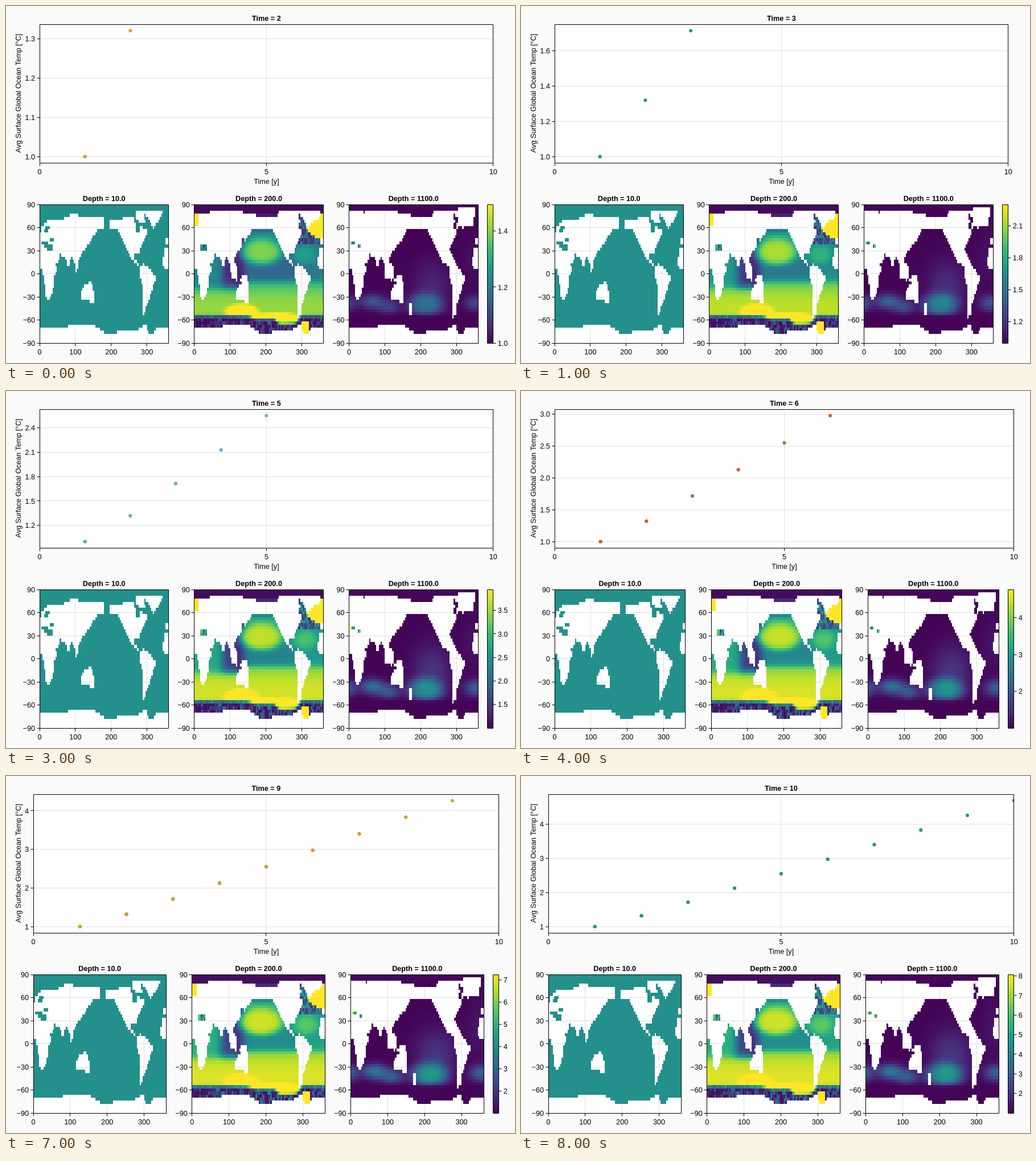
An HTML page with a canvas for the animation above (9000 ms loop, 894 by 626 pixels).

```html
<!DOCTYPE html>
<html>
<head>
<meta charset="utf-8">
<style>
html, body { margin: 0; width: 100%; height: 100%; overflow: hidden; background: #fafafa; }
canvas { display: block; }
</style>
</head>
<body>
<canvas id="stage" width="894" height="626"></canvas>
<script>
const ctx = document.getElementById('stage').getContext('2d');
const FONT = '12.65px "Liberation Sans", Arial, sans-serif';
const TOP = 32, TOP_END = 275, MAP = 348, MAP_END = 591, CELL = 4, COLS = 90, ROWS = 45;
const dotColors = ['#1f76b3', '#dfa014', '#159f75', '#c878a5', '#5eafda', '#cf611a', '#f1e23a'];
const viridis = ['440154', '482878', '3e4989', '31688e', '26828e', '1f9e89', '35b779', '6ece58', 'b5de2b', 'fde725']
  .map(h => [0, 2, 4].map(i => parseInt(h.substr(i, 2), 16)));

const meanTemp = year => 1 + .4325 * (year - 1) - .225 * (year - 1) / year;
const colorTop = year => 3.113 + .8263 * (year - 4) + .14 / year ** 2;
const clamp = v => Math.max(0, Math.min(1, v));
const mix = (a, b, k) => a + (b - a) * k;
function shade(v) {
  const p = clamp(v) * 9, i = Math.min(8, Math.floor(p));
  return viridis[i].map((a, k) => Math.round(mix(a, viridis[i + 1][k], p - i)));
}

// Key points of the coasts in degrees: longitude 0..360, latitude -90..90
const paths = list => list.map(d => new Path2D(d));
const coast = paths([
  'M0 48 6 60 26 71 60 70 96 79 114 75 181 73 181 60 163 58 143 43 124 30 109 19 109 10 103 1 97 17 90 22 79 7 72 21 58 25 52 13 43 12 34 30 0 30z',
  'M0 35 33 31 43 11 51 11 40 -6 40 -15 28 -34 19 -35 13 -10 8 4 0 6z',
  'M360 5 352 5 343 14 350 32 360 36zM352 37H360V48L352 43z',
  'M197 56 197 71 264 73 269 56 280 52 282 62 304 54 279 32 278 26 264 28 263 19 273 17 278 9 290 12 308 6 325 -6 302 -38 291 -54 286 -50 289 -18 280 -4 282 7 255 20 236 42 214 60z',
  'M268 83 344 82 336 70 318 60 304 74 290 77 298 66 284 64 268 73z',
  'M115 -35 114 -23 128 -13 143 -11 153 -26 150 -39 130 -32z'
]);
const coastSeas = paths(['M0 37 10 38 20 31 36 32 36 36 12 44zM28 41H40V46H28zM12 55 22 55 26 60 20 64z']);
const shelf = paths([
  'M12 60 14 79 100 82 172 78 174 74 230 74 236 80 288 82 292 60 262 50 230 58 160 58z',
  'M288 82H352L354 73 326 68 308 74zM0 30V62L14 60H48V30z',
  'M98 18 104 -4 118 -8 119 8 110 20zM128 -10 132 0 148 -4 154 -26z',
  'M300 -38 302 -50 290 -56z'
]);
const shelfSeas = paths(['M16 38H34V32H16zM132 44H138V40H132z']);
const deep = paths([
  'M280 50 300 50 304 84H350L348 64 312 64zM0 40V82H40V40z',
  'M264 32 262 16 282 8 300 12 280 32zM140 60 163 60 146 42z',
  'M98 14 100 -6 126 -8 122 10 110 18zM169 -37H174V-53H169z'
]);
const deepSeas = paths(['M4 42H16V38H4zM24 38H32V34H24z']);
const layers = [
  { name: '10.0', land: coast, sea: coastSeas, field: () => .5 },
  { name: '200.0', land: [...coast, ...shelf], sea: shelfSeas, field: upper },
  { name: '1100.0', land: [...coast, ...shelf, ...deep], sea: deepSeas, field: lower }
];

const step = x => 1 / (1 + Math.exp(-x));
const bump = (x, c, r, p = 4) => Math.exp(-(Math.abs((x - c) / r) ** p));
const blob = (x, y, cx, cy, rx, ry, p = 2) => Math.exp(-(Math.hypot((x - cx) / rx, (y - cy) / ry) ** p));
const noise = (x, y) => Math.abs(Math.sin(x * 12.9 + y * 78.2) * 43758) % 1;
const iceEdge = x => -70 + 4 * bump(x, 120, 42) - 5 * bump(x, 222, 56) - 3 * bump(x, 196, 20)
  + 6 * bump(x, 294, 6) - 8 * bump(x, 312, 11);

// Share of the colour range in the second year
function upper(x, y) {
  if (y > 79) return .02;
  if (y > 60 && x < 14) return 1;
  if (y > 60 && x < 290) return .08;
  if (y > 30 && x < 40) return .1 + .5 * noise(x, y);
  if (y > 36 && x > 285) {
    const north = x > 312 && y > 44 + Math.max(0, 345 - x) * .4;
    return north ? 1 : .1 + .4 * noise(x, y) ** 2;
  }
  if (y < -61 && x > 298 && x < 322) return 1;

  const indian = x < 120, atlantic = x > 290 || (x > 262 && y > 12);
  let v = indian ? .46 - .34 * step((x - 78) / 6) : atlantic ? .4 : .08 + .25 * step((x - 140) / 6);
  if (!indian && !atlantic) {
    v = mix(v, .5, step((y - 43) / 2) * step((x - 145) / 6));
    v = mix(v, .25, step((y - 55) / 2));
    v = mix(v, .8, blob(x, y, 188, 29, 60, 18, 5));
  }
  if (atlantic) v = mix(v, .56, blob(x, y, 310, 25, 32, 13, 4));

  // the warm southern ocean, ending in a cold fringe
  const start = indian ? -18 : x < 152 ? -20 : -10;
  const warm = .7 + .14 * step((-24 - y) / 5)
    + .25 * blob(x, y, 132, -50, 48, 11, 6) + .25 * blob(x, y, 228, -59, 68, 9, 6);
  v = mix(v, warm, step((start - y) / 2.5));
  const rim = -55 - 4 * step((x - 160) / 5) - 6 * bump(x, 260, 32, 8) + 4 * step((x - 290) / 4);
  return mix(.02 + .3 * noise(x, y) ** 3, v, step((y - rim) / .9));
}
function lower(x, y) {
  if (y > 79) return .01;
  if (y > 30 && x < 40) return .2 + .8 * noise(x, y);
  const west = x > 180 ? x - 360 : x;
  const v = .32 * blob(x, y, 213, -40, 48, 15, 3) + .1 * blob(x, y, 230, -16, 52, 32)
    + .26 * blob(x, y, 65, -36, 32, 9) + .18 * blob(x, y, 112, -43, 30, 9)
    + .2 * blob(west, y, -8, -38, 28, 10) + .03 * blob(x, y, 345, 20, 30, 35);
  return .005 + v * step((y + 54) / 1.2);
}

const hit = (list, x, y) => list.some(p => ctx.isPointInPath(p, x, y));
for (const layer of layers) {
  layer.cells = [];
  for (let r = 0; r < ROWS; r++) for (let c = 0; c < COLS; c++) {
    const x = CELL * (c + .5), y = 90 - CELL * (r + .5);
    if (y < iceEdge(x) || (hit(layer.land, x, y) && !hit(layer.sea, x, y))) continue;
    layer.cells.push([r * COLS + c, clamp(layer.field(x, y))]);
  }
}
const tile = document.createElement('canvas');
tile.width = COLS;
tile.height = ROWS;
const tileCtx = tile.getContext('2d');

function drawCells(layer, year, x, w) {
  const image = tileCtx.createImageData(COLS, ROWS);
  const power = layer.field === upper || layer.field === lower ? 1 + .8 * (1 - 2 / year) : 1;
  for (const [i, f] of layer.cells) image.data.set([...shade(1 - (1 - f) ** power), 255], i * 4);
  tileCtx.putImageData(image, 0, 0);
  ctx.imageSmoothingEnabled = false;
  ctx.drawImage(tile, x, MAP, w, MAP_END - MAP);
}

function line(x1, y1, x2, y2, color = '#000') {
  const snap = v => Math.floor(v) + .5;
  ctx.strokeStyle = color;
  ctx.beginPath();
  ctx.moveTo(snap(x1), snap(y1));
  ctx.lineTo(snap(x2), snap(y2));
  ctx.stroke();
}
function text(s, x, y, align = 'center', bold = false) {
  ctx.font = (bold ? 'bold ' : '') + FONT;
  ctx.textAlign = align;
  ctx.fillStyle = '#000';
  ctx.fillText(s, x, y);
}
function frame(x, y, w, h) {
  line(x, y, x + w, y);
  line(x, y + h, x + w, y + h);
  line(x, y, x, y + h);
  line(x + w, y, x + w, y + h);
}
function axes(title, x, y, w, h, xTicks, yTicks, content) {
  ctx.fillStyle = '#fff';
  ctx.fillRect(x, y, w, h);
  for (const [p] of xTicks) line(x + p, y, x + p, y + h, '#dfdfdf');
  for (const [p] of yTicks) line(x, p, x + w, p, '#dfdfdf');
  ctx.save();
  ctx.beginPath();
  ctx.rect(x, y, w + .5, h);
  ctx.clip();
  content();
  ctx.restore();
  frame(x, y, w, h);
  for (const [p, s] of xTicks) {
    line(x + p, y + h, x + p, y + h + 5);
    text(s, x + p, y + h + 19.5);
  }
  for (const [p, s] of yTicks) {
    line(x - 5, p, x, p);
    text(s, x - 8, p + 4.7, 'right');
  }
  text(title, x + w / 2, y - 6, 'center', true);
}
const decimals = gap => gap === 1 ? 0 : gap === .25 ? 2 : 1;
function series(min, max, gap, place) {
  const out = [];
  for (let n = Math.ceil(min / gap - 1e-6); n * gap <= max; n++) {
    out.push([place(n * gap), (n * gap).toFixed(decimals(gap))]);
  }
  return out;
}

function draw(year) {
  const yGap = [.1, .2, .25, .3, .5][year - 2] || 1;
  const barGap = [.2, .3, .5, .5][year - 2] || 1;
  const left = [48, 59, 66][decimals(yGap)], right = barGap < 1 ? 829 : 839, end = right + 26.8;
  const margin = (meanTemp(year) - 1) * .05, span = margin * 22;
  const yOf = v => TOP_END - (v - 1 + margin) / span * (TOP_END - TOP) + .2;
  const topWidth = end - left;
  ctx.fillStyle = '#fafafa';
  ctx.fillRect(0, 0, 894, 626);
  ctx.lineWidth = 1;

  axes('Time = ' + year, left, TOP, topWidth, TOP_END - TOP,
    [0, 5, 10].map(v => [v / 10 * topWidth, v]),
    series(1 - margin, 1 - margin + span, yGap, yOf), () => {
      // every year's dots lie over the earlier ones
      for (let n = 1; n <= year; n++) {
        ctx.fillStyle = dotColors[(n - 1) % 7];
        for (let k = 1; k <= n; k++) {
          ctx.beginPath();
          ctx.arc(left + k / 10 * topWidth, yOf(meanTemp(k)), 2.9, 0, 7);
          ctx.fill();
        }
      }
    });
  text('Time [y]', left + topWidth / 2, 312);
  ctx.save();
  ctx.translate(25.6, 153);
  ctx.rotate(-Math.PI / 2);
  text('Avg Surface Global Ocean Temp [°C]', 0, 0);
  ctx.restore();

  const gutter = 45.4, w = (right - left - 2 * gutter) / 3;
  const latTicks = [90, 60, 30, 0, -30, -60, -90]
    .map(v => [MAP + (90 - v) * 1.35, String(v).replace('-', '\u2212')]);
  layers.forEach((layer, i) => {
    const x = left + i * (w + gutter);
    axes('Depth = ' + layer.name, x, MAP, w, MAP_END - MAP,
      [0, 100, 200, 300].map(v => [v / 360 * w, v]), latTicks,
      () => drawCells(layer, year, x, w));
  });

  const top = colorTop(year), height = MAP_END - MAP;
  const ramp = ctx.createLinearGradient(0, MAP_END, 0, MAP);
  viridis.forEach((c, i) => ramp.addColorStop(i / 9, `rgb(${c})`));
  ctx.fillStyle = ramp;
  ctx.fillRect(right + 16, MAP, 10.8, height);
  frame(right + 16, MAP, 10.8, height);
  const barMin = year < 5 ? 1 : 1.01;
  for (const [p, s] of series(barMin, top, barGap, v => MAP_END - (v - 1) / (top - 1) * height)) {
    line(end, p, end + 5, p);
    text(s, end + 8, p + 4.7, 'left');
  }
}

let shown = 0;
const start = performance.now();
function tick(now) {
  const year = 2 + Math.floor(Math.max(0, now - start) % 9000 / 1000);
  if (year !== shown) draw(shown = year);
  requestAnimationFrame(tick);
}
tick(start);
</script>
</body>
</html>
```
